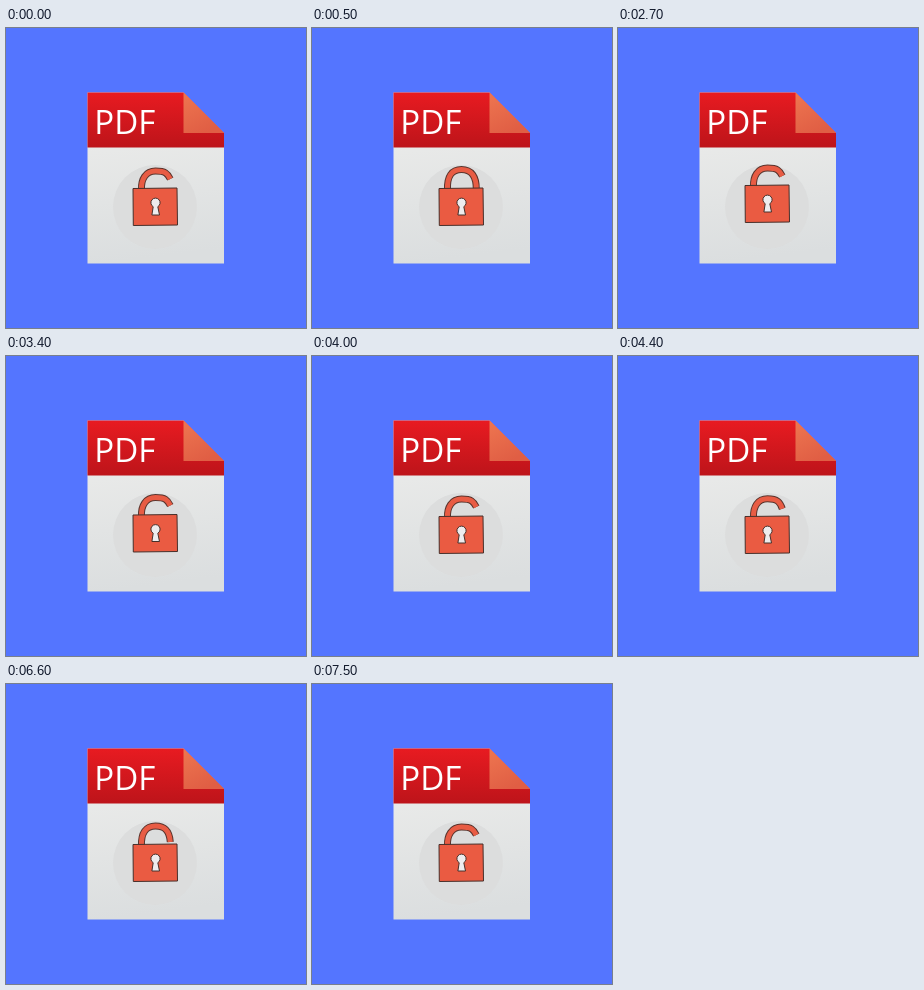
Write an HTML page that moves like this. It is 300 px wide and 300 px high and loops after 8300 ms.

```html
<!DOCTYPE html>
<html lang="en">
<head>
<meta charset="utf-8">
<title>PDF lock</title>
<style>
html, body { margin: 0; width: 100%; height: 100%; overflow: hidden; background: #5475ff; }
svg { display: block; width: 100vw; height: 100vh; }
</style>
</head>
<body>
<svg viewBox="0 0 300 300">
  <defs>
    <linearGradient id="paper" x2=".1" y2="1">
      <stop stop-color="#efefed"/><stop offset="1" stop-color="#dbdedf"/>
    </linearGradient>
    <linearGradient id="header" x2="0" y2="1">
      <stop stop-color="#e81b21"/><stop offset="1" stop-color="#bd141a"/>
    </linearGradient>
    <linearGradient id="fold" x2=".5" y2="1">
      <stop stop-color="#ee7650"/><stop offset="1" stop-color="#e05e44"/>
    </linearGradient>
  </defs>

  <path d="M81.5 64.5H177.5L218 105V235.5H81.5Z" fill="url(#paper)"/>
  <path d="M81.5 64.5H177.5L218 105V119.5H81.5Z" fill="url(#header)"/>
  <path d="M177.5 64.5V105H218Z" fill="url(#fold)"/>
  <text x="88.3" y="106.4" font-family="'Open Sans', 'Noto Sans', sans-serif" font-size="33" fill="#fff">PDF</text>
  <circle cx="149" cy="179" r="42" fill="#dcdddd"/>

  <g id="lock" stroke-linejoin="round">
    <path class="shackle" fill="none" stroke="#5a352e" stroke-width="7"/>
    <path class="shackle" fill="none" stroke="#e85c44" stroke-width="5"/>
    <path d="M127.5 161L171.5 160.5L172 197.5L127.8 198Z" fill="#ea5b42" stroke="#47302b"/>
    <path d="M147.7 179.2A4.6 4.6 0 1 1 152.3 179.2L154 187.5H146.4Z" fill="#eeecee" stroke="#47302b"/>
  </g>
</svg>
<script>
const LOOP = 8300, STEP = 200;
const lock = document.getElementById('lock');
const shackles = document.querySelectorAll('.shackle');
const start = performance.now();

const ramp = (t, from, to) => Math.min(1, Math.max(0, (t - from) / (to - from)));

function draw() {
  const now = Math.max(0, performance.now() - start) % LOOP;
  // The picture moves in steps, on odd tenths of a second
  const t = Math.floor((now - 100) / STEP) * STEP + 100;
  const shut = ramp(t, -100, 500) - ramp(t, 2100, 2700) + ramp(t, 4100, 5300) - ramp(t, 6300, 6900);
  const lift = 3 * (ramp(t, 2100, 2700) - ramp(t, 3100, 3500));
  const mix = (open, closed) => open + (closed - open) * shut;

  const top = mix(143.6, 142);
  const d = `M136 162C135.5 ${mix(152, 149)} 140 ${top} 150 ${top}`
    + `S${mix(162, 165)} ${mix(146, 149)} 164.8 ${mix(151.5, 162)}`;
  for (const s of shackles) s.setAttribute('d', d);
  lock.setAttribute('transform', `translate(-.5 ${-.5 - lift})`);
  requestAnimationFrame(draw);
}
draw();
</script>
</body>
</html>
```
